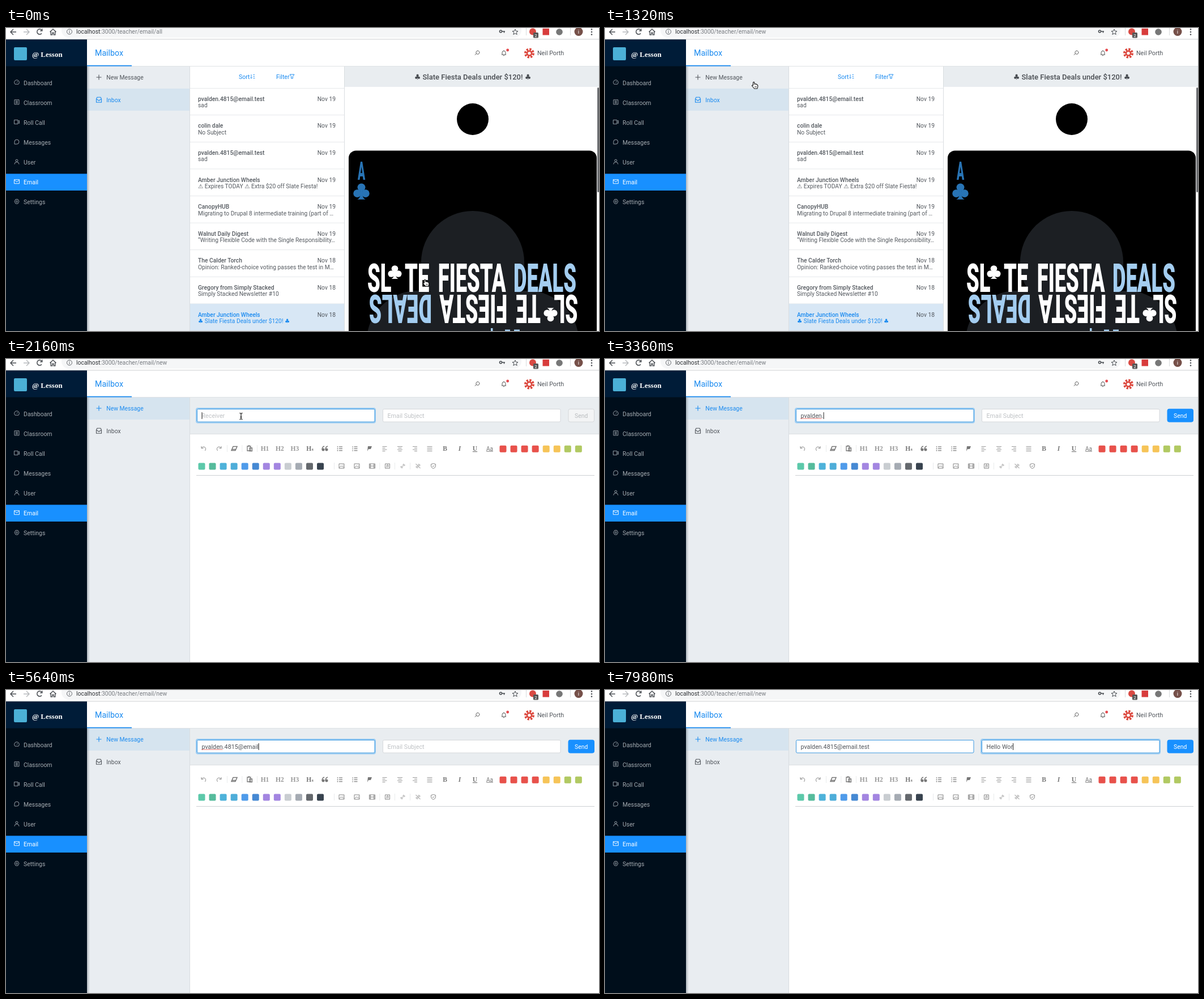
Recreate the animation shown at these times as an HTML page. Size 1047 px wide and 535 px high, loop 8 s.

```html
<!DOCTYPE html>
<html lang="en">
<head>
<meta charset="utf-8">
<title>Mailbox</title>
<style>
  html, body { margin: 0; width: 100%; height: 100%; overflow: hidden; background: #fff; }
  svg { display: block; width: 100vw; height: 100vh; font-family: Roboto, "DejaVu Sans", sans-serif; }
  text { white-space: pre; }
  .serif { font-family: "Liberation Serif", serif; font-weight: bold; }
</style>
</head>
<body>
<svg id="stage" viewBox="0 0 1047 535"></svg>
<script>
const BLUE = '#1b8bf0', DARK = '#50555b', GRAY = '#8c8c8c';

const text = (x, y, s, size = 10.3, fill = DARK, more = '') =>
  `<text x="${x}" y="${y}" font-size="${size}" fill="${fill}" ${more}>${s}</text>`;
const rect = (x, y, w, h, fill, more = '') =>
  `<rect x="${x}" y="${y}" width="${w}" height="${h}" fill="${fill}" ${more}/>`;
const dot = (x, y, r, fill, more = '') => `<circle cx="${x}" cy="${y}" r="${r}" fill="${fill}" ${more}/>`;
const icon = (x, y, d, color = GRAY, width = 1) =>
  `<path transform="translate(${x} ${y})" d="${d}" fill="none" stroke="${color}" stroke-width="${width}"/>`;
const group = (id, body, more = '') => `<g id="${id}" ${more}>${body}</g>`;
const club = (x, y, scale, fill) => `<g transform="translate(${x} ${y}) scale(${scale})" fill="${fill}">
  <circle cy="-7" r="6.8"/><circle cx="-7.2" cy="3.5" r="6.8"/><circle cx="7.2" cy="3.5" r="6.8"/>
  <path d="M-2-4h4v9q0 7 5 9h-14q5-2 5-9z"/></g>`;
const middle = 'text-anchor="middle"', end = 'text-anchor="end"', medium = 'font-weight="500"';

const shapes = {
  mail: 'M-4.5-3.5h9v7h-9zM-4.5-3l4.5 3.5 4.5-3.5',
  gear: 'M-4 0l2-3.8h4l2 3.8-2 3.8h-4zM-1.5 0a1.5 1.5 0 1 0 3 0a1.5 1.5 0 1 0-3 0',
  gauge: 'M-3 3.5a4.3 4.3 0 1 1 6 0zM0 .5l1.8-2',
  book: 'M-4-4h8v8h-8zM-2-1.8h4M-2 0h4M-2 1.8h4',
  video: 'M-4.5-3.5h6.5v7h-6.5zM2-1l2.5-1.5v5l-2.5-1.5',
  bubble: 'M-4 4v-4a4 4 0 1 1 4 4z',
  user: 'M-2-2a2 2 0 1 0 4 0a2 2 0 1 0-4 0M-4 4.5q0-4 4-4t4 4',
  inbox: 'M-4.5 4.5v-6l1.5-3h6l1.5 3v6zM-4.5-.5h2.5l1 2h2l1-2h2.5',
  plus: 'M-4.5 0h9M0-4.5v9',
  picture: 'M-4.5-4h9v8h-9zM-4 3l3-3.5 2 2 1.2-1.2 2 2.7M2-1.5h1',
  film: 'M-5-4h10v8h-10zM-3-4v8M3-4v8M-3 0h6M-5-1.5h2M-5 1.5h2M3-1.5h2M3 1.5h2',
  music: 'M-4-4h8v8h-8zM-1 2v-4h2.5v3.5M-2 2h1M.5 1.5h1',
  link: 'M-1.5 1.5l3-3M0-2l1.5-1.5 2 2-1.5 1.5M0 2l-1.5 1.5-2-2 1.5-1.5',
  shield: 'M0-4.5l4 1.3v3q0 3-4 4.7-4-1.7-4-4.7v-3zM-1.8-.3l1.4 1.4 2.4-2.4',
  undo: 'M-4-4v3.5h3.5M-4-.5q3-4 6.5-1.5 2.5 2.5 0 6',
  redo: 'M4-4v3.5h-3.5M4-.5q-3-4-6.5-1.5-2.5 2.5 0 6',
};

function browserBar() {
  return rect(0, 0, 1047, 20, '#fff') + rect(98, -9, 812, 26, '#f5f6f7', 'rx="13"') +
    icon(13, 7, 'M5 0h-10M0-5l-5 5 5 5', '#4b4f54', 1.5) +
    icon(36, 7, 'M-5 0h10M0-5l5 5-5 5', '#b8bbbe', 1.5) +
    icon(59, 6.5, 'M4 3a4.6 4.6 0 1 1 .2-5.6M4.8-5v3.6h-3.6', '#4b4f54', 1.5) +
    icon(83, 7, 'M-5.5 0l5.5-5 5.5 5M-3.8-1v6h2.5v-3.5h2.6v3.5h2.5v-6', '#4b4f54', 1.4) +
    icon(112, 6.5, 'M-4.5 0a4.5 4.5 0 1 0 9 0a4.5 4.5 0 1 0-9 0M0-.8v3.3M0-2.8v1.2', '#5f6368') +
    `<text x="124" y="10.3" font-size="10.4" fill="#2e3135">localhost<tspan fill="#777b80">:3000/teacher/email/<tspan id="page"></tspan></tspan></text>` +
    dot(873.5, 6, 2, 'none', 'stroke="#4b4f54" stroke-width="1.6"') +
    icon(877, 6, 'M-1 0h5M2.5 0v2.5', '#4b4f54', 1.6) +
    icon(899, 7, 'M0-5l1.4 3.4 3.6.2-2.8 2.3 1 3.6-3.2-2-3.2 2 1-3.6-2.8-2.3 3.6-.2z', '#4b4f54') +
    rect(918, 0, 1, 13, '#d8dadc') +
    dot(930, 6.5, 6, '#d94a43') + rect(931, 8, 9, 9.5, '#555', 'rx="1.5"') +
    text(935.5, 15.7, '2', 8, '#fff', middle) +
    rect(947.5, 1, 11.5, 11.5, '#d83c3c') + dot(977, 7, 5.8, '#777') +
    rect(996, 0, 1, 13, '#d8dadc') + dot(1011, 6.5, 7.5, '#765049') +
    text(1011, 10, 'i', 9.5, '#fff', middle) +
    [2.5, 7, 11.5].map(y => dot(1034, y, 1.3, '#4b4f54')).join('') +
    rect(0, 19.5, 1047, 1, '#b9bcbf');
}

function sidebar() {
  const items = [['Dashboard', 'gauge'], ['Classroom', 'book'], ['Roll Call', 'video'], ['Messages', 'bubble'],
    ['User', 'user'], ['Email', 'mail'], ['Settings', 'gear']];
  return rect(0, 20.5, 143, 514.5, '#000e1b') + rect(0, 20.5, 143, 47, '#001c38') +
    rect(14, 34, 23, 23, '#4bb0d6', 'rx="2"') + text(46, 51, '@ Lesson', 13, '#fff', 'class="serif"') +
    rect(0, 257.4, 143, 29.6, '#1890ff') +
    items.map(([label, shape], i) => {
      const y = 97 + 35.1 * i, color = i === 5 ? '#fff' : '#a5abb1';
      return icon(19, y - 1.3, shapes[shape], color, .9) + text(31, y + 3.8, label, 10.5, color);
    }).join('');
}

function header() {
  return rect(143, 20.5, 904, 47, '#fff') + rect(143, 67, 904, 1, '#dfe2e5') +
    text(157, 49.3, 'Mailbox', 14.2, BLUE) + rect(143, 65.7, 79, 1.8, BLUE) +
    icon(832, 44, 'M-1.5 1a3 3 0 1 1 2 1.2 3 3 0 0 1-2-1.2l-2.5 2.7', '#555') +
    icon(879, 44, 'M-4 3h8M-3 3v-3.5a3 3 0 0 1 6 0v3.5M-1 4.7h2M0-4.5v1', '#555') + dot(885.7, 39, 2.4, '#e5484d') +
    dot(924, 44.6, 7, 'none', 'stroke="#dc493f" stroke-width="4" stroke-dasharray="3.3 2.2"') +
    dot(924, 44.6, 4, 'none', 'stroke="#dc493f" stroke-width="2.6"') +
    text(938, 48.4, 'Neil Porth', 10.7);
}

// Mail menu with either its first or second entry chosen
function menu(chosen) {
  const entry = (i, label, shape, y) => {
    const color = i === chosen ? BLUE : DARK;
    return icon(164, y, shapes[shape], color, 1.1) + text(177.3, y + 3.8, label, 10.35, color);
  };
  return rect(143, 68, 181.5, 467, '#e9edf1') + rect(143, 68 + 39 * chosen, 181.5, 39, '#d6e4ef') +
    entry(0, 'New Message', 'plus', 87) + entry(1, 'Inbox', 'inbox', 126.7);
}

function inbox() {
  const me = 'pvalden.4815@email.test', deal = '♣ Slate Fiesta Deals under $120! ♣';
  const rows = [
    [me, 'sad'], ['colin dale', 'No Subject'], [me, 'sad'],
    ['Amber Junction Wheels', '⚠ Expires TODAY ⚠ Extra $20 off Slate Fiesta!'],
    ['CanopyHUB', 'Migrating to Drupal 8 intermediate training (part of …'],
    ['Walnut Daily Digest', '“Writing Flexible Code with the Single Responsibility…'],
    ['The Calder Torch', 'Opinion: Ranked-choice voting passes the test in M…'],
    ['Gregory from Simply Stacked', 'Simply Stacked Newsletter #10'],
    ['Amber Junction Wheels', deal],
  ];
  const list = rows.map(([from, subject], i) => {
    const y = 106.3 + 47.6 * i, on = i === 8, color = on ? BLUE : '#555a60';
    return (on ? rect(325, y, 272, 47.6, '#d8e7f5') : '') + rect(325, y + 47, 272, .8, '#e0e3e6') +
      text(339, y + 22.4, from, 10.3, color, medium) +
      text(582, y + 22.4, `Nov ${i < 6 ? 19 : 18}`, 10.3, DARK, end) +
      text(339, y + 33.8, subject, 10.3, color);
  }).join('');
  const word = (x, s, fill) => text(x, 0, s, 70, fill, 'font-weight="900" transform="scale(.52 1)"');
  const lettering = `<g transform="translate(638 466)">${word(0, 'SL', '#fff') + word(127, 'TE', '#fff') +
    word(240, 'FIESTA', '#fff') + word(496, 'DEALS', '#a3cdf0')}</g>` + club(686.5, 431, .86, '#fff');
  return rect(325, 68, 722, 467, '#fff') + rect(325, 106, 272, .8, '#e0e3e6') +
    text(411, 90, 'Sort', 10.5, BLUE) + icon(435.5, 85.5, 'M-2.5-3.5v7M-4 2l1.5 1.5 1.5-1.5M1-3h2.5M1 0h2.5M1 3h3', BLUE, .9) +
    text(477, 90, 'Filter', 10.5, BLUE) + icon(505, 85.5, 'M-4-3.5h8l-2.7 3.5v3.5h-2.6v-3.5z', BLUE) +
    list + rect(597, 68, 1, 467, '#d9dde0') +
    rect(598, 68, 449, 36, '#e9edf0') + text(824, 91, deal, 13, '#484c51', `${medium} ${middle}`) +
    dot(824, 161, 28, '#000') +
    rect(605, 216.5, 438, 340, '#000', 'rx="13"') +
    text(0, 0, 'A', 45, '#2874b5', `font-weight="900" ${middle} transform="translate(627.5 268) scale(.43 1)"`) +
    club(627.5, 288.5, 1.02, '#2874b5') +
    club(824, 508, 13.4, '#1c1f23') + lettering + `<g transform="rotate(180 824 468.7)">${lettering}</g>` +
    rect(856, 530, 3.5, 5, '#a3cdf0') + rect(881, 532.5, 9, 2.5, '#a3cdf0') + rect(897, 532.5, 10, 2.5, '#a3cdf0') +
    rect(1044, 105, 3, 185, '#6b6d70', 'rx="1.5"');
}

const swatches = ['#e8514b', '#e8514b', '#e8514b', '#e8514b', '#f6c458', '#f6c458', '#b1c962', '#b1c962',
  '#5cc9aa', '#56bb9c', '#4eb2da', '#4eadd9', '#4f9bea', '#4689d3', '#a386e1', '#a386e1',
  '#c9cdd1', '#a5abb3', '#64686d', '#38434f'];
const colorRow = (x, first, split) => swatches.map((c, i) => {
  const left = i < split ? x + 19.05 * i : 345.5 + 19.05 * (i - split);
  return rect(left - 6, i < split ? first - 6 : first + 24.7, 12, 12, c, 'rx="2"');
}).join('');
const bars = (xs, y) => xs.map(x => rect(x, y - 6, .8, 12, '#e4e6e8')).join('');

function bareTools() {
  return bars([336, 383, 406, 431, 616.5, 709.5], 158) + colorRow(812.5, 158.7, 12) +
    bars([503, 550, 573, 597.5, 621.5, 645], 189);
}

function tools() {
  const lines = (x, ws, align) => ws.map((w, i) =>
    rect(x - 4.5 + (9 - w) * align, 154 + i * 2.7, w, 1, '#9a9a9a')).join('');
  const letter = (x, s, more = '', size = 11.5) => text(x, 162, s, size, '#777', `${middle} class="serif" ${more}`);
  return icon(349, 158, shapes.undo) + icon(376, 158, shapes.redo) +
    icon(403, 158, 'M-5 3.5l3-7h7l-3 7zM-4 1.5h7', '#777', 1.5) +
    icon(430, 158, 'M-4-4h6v8h-6zM-2-5h2M0-1h4.5v5.5h-4.5z', '#777', 1.3) +
    ['H1', 'H2', 'H3'].map((s, i) => letter(457 + 26.4 * i, s, 'opacity=".75"')).join('') +
    letter(536.5, 'H<tspan font-size="7">4</tspan>') +
    [560, 566].map(x => dot(x, 160, 2.5, '#777') + icon(x, 158, 'M-2 2q0-5 4-6', '#777', 1.3)).join('') +
    [0, 1, 2].map(i => {
      const y = 154.5 + 3.3 * i;
      return dot(585.5, y + .6, .9, '#777') + rect(588, y, 6, 1.2, '#777') +
        rect(611.5, y - .3, 1, 2, '#777') + rect(614.5, y, 6, 1.2, '#777');
    }).join('') +
    `<path d="M639 154h7l-2 5h-4l-2 4z" fill="#777"/>` +
    lines(669, [8, 5, 8, 5], 0) + lines(695.5, [9, 6, 9, 6], .5) + lines(721.5, [8, 5, 8, 5], 1) +
    lines(748, [9, 9, 9, 9], 0) +
    letter(775, 'B') + letter(801, 'I', 'font-style="italic"') +
    letter(828, 'U', 'text-decoration="underline"') +
    text(854, 161.5, 'Aa', 10, '#777', `${middle} text-decoration="underline"`) +
    bars([390, 416.5, 443], 158) + colorRow(877.5, 158.7, 8) + bars([579, 659.5, 686, 713], 189) +
    ['picture', 'picture', 'film', 'music', 'link', 'link', 'shield'].map((s, i) =>
      icon(592.5 + 27 * i, 189, shapes[s], '#858585')).join('') +
    icon(727.5, 189, 'M-4-4l8 8', '#858585');
}

function field(id, x, hint) {
  return group(id, rect(x - 1, 87, 316, 25.5, 'none', 'class="glow" rx="3" stroke="#9accf3" stroke-width="2"') +
    rect(x + .5, 88.5, 313.5, 22.5, '#fff', 'class="box" rx="2"') +
    text(x + 8.5, 104, hint, 10.75, '#bfc2c5', 'class="hint"') +
    text(x + 8.5, 104, '', 10.75, DARK, 'class="value"') +
    `<path class="spell" stroke="#e0352b" stroke-width="1.2" stroke-dasharray="1.2 1"/>` +
    rect(0, 94, 1, 12, '#222', 'class="caret"'));
}

const $ = id => document.getElementById(id);
$('stage').innerHTML = `<defs><linearGradient id="shade"><stop stop-color="#8d959d" stop-opacity=".6"/>
  <stop offset="1" stop-color="#8d959d" stop-opacity="0"/></linearGradient></defs>` +
  rect(0, 0, 1047, 535, '#fff') + browserBar() + sidebar() + header() +
  menu(1) + group('menuNew', menu(0)) + rect(143, 68, 5, 467, 'url(#shade)') + rect(324, 68, 1, 467, '#d9dde0') +
  group('inbox', inbox()) +
  group('compose', rect(325, 68, 722, 64, '#e9edf0') + rect(325, 132, 722, 1, '#dcdfe2') +
    field('to', 337, 'Receiver') + field('subject', 665, 'Email Subject') +
    rect(993, 88.3, 45.5, 22.8, '#f3f4f5', 'id="send" rx="3"') +
    text(1015.7, 103.7, 'Send', 10.4, '#fff', `id="sendLabel" ${middle}`) +
    group('bare', bareTools()) + group('tools', tools()) + rect(336, 205, 703, 1, '#cdd0d3')) +
  group('hand', `<path d="M-2.5 0v-4.2q0-1.4 1.2-1.4t1.2 1.4v2.2q2.8-.6 5 1.2 1.5 1.2.8 4l-.9 2.8h-5.2q-2-2.5-4.2-5 .8-1.6 2.1-1z"
    fill="#fff" stroke="#111" stroke-width="1.1"/><path d="M1 1.5v2.5M3 1.5v2.5" stroke="#111" stroke-width=".8"/>`) +
  group('beam', `<path d="M-2.7-5.5q2 0 2.7 1 .7-1 2.7-1M0-4.5v9M-2.7 5.5q2 0 2.7-1 .7 1 2.7 1M-1.5 1.5h3"
    fill="none" stroke="#111" stroke-width="1.2"/>`);

const show = (el, on) => el.setAttribute('visibility', on ? 'inherit' : 'hidden');
const set = (el, attrs) => { for (const k in attrs) el.setAttribute(k, attrs[k]); };
const ramp = (t, a, b) => Math.min(1, Math.max(0, (t - a) / (b - a)));
const ease = u => u * u * (3 - 2 * u);

// Bursts of typing: first key time, number of keys, gap between keys
const keys = bursts => bursts.flatMap(([t, n, gap]) => Array.from({ length: n }, (_, i) => t + i * gap));
const inputs = [
  { id: 'to', x: 345.5, str: 'pvalden.4815@email.test', from: 2050, until: 6540,
    keys: keys([[2600, 8, 100], [3880, 4, 200], [4800, 1, 0], [5080, 5, 120], [5800, 5, 100]]) },
  { id: 'subject', x: 673.5, str: 'Hello Wor', from: 6540, until: 8000, keys: keys([[6960, 9, 115]]) },
];

function drawField({ id, x, str, from, until, keys }, t) {
  const part = name => $(id).querySelector('.' + name);
  const n = keys.filter(k => k <= t).length, focus = t >= from && t < until;
  const value = part('value');
  value.textContent = str.slice(0, n);
  show(part('hint'), !n);
  part('glow').setAttribute('opacity', focus ? ramp(t, from, from + 100) : 0);
  part('box').setAttribute('stroke', t >= from ? '#3b98e0' : '#d5d8db');
  const since = t - (n ? keys[n - 1] : from);
  show(part('caret'), focus && since % 1000 < 500);
  part('caret').setAttribute('x', x + (n ? value.getComputedTextLength() : 0));
  const misspelt = id === 'to' && focus && n >= 8;
  show(part('spell'), misspelt);
  if (misspelt) part('spell').setAttribute('d', `M${x} 105.2h${value.getSubStringLength(0, 7)}`);
}

function draw(t) {
  const composing = t >= 1380, ready = t >= 1500, typed = t >= 2600;
  $('page').textContent = t < 1260 ? 'all' : 'new';
  show($('inbox'), !composing);
  show($('compose'), composing);
  show($('bare'), composing && !ready);
  show($('tools'), ready);
  $('menuNew').setAttribute('opacity', ramp(t, 1440, 1740));
  inputs.forEach(f => drawField(f, t));
  set($('send'), { fill: typed ? '#1890ff' : '#f3f4f5', stroke: typed ? '#1890ff' : '#d5d8db' });
  $('sendLabel').setAttribute('fill', typed ? '#fff' : '#b9bcbf');

  const go = ease(ramp(t, 60, 1140)), on = ease(ramp(t, 1500, 1980));
  const x = 741 - 477 * go + 151 * on, y = 450 - 349 * go;
  const beam = on > 0 && x > 337;
  show($('hand'), !beam);
  show($('beam'), beam && !typed);
  for (const id of ['hand', 'beam']) $(id).setAttribute('transform', `translate(${x} ${y})`);
}

const start = performance.now();
(function frame() {
  draw((performance.now() - start) % 8000);
  requestAnimationFrame(frame);
})();
</script>
</body>
</html>
```
